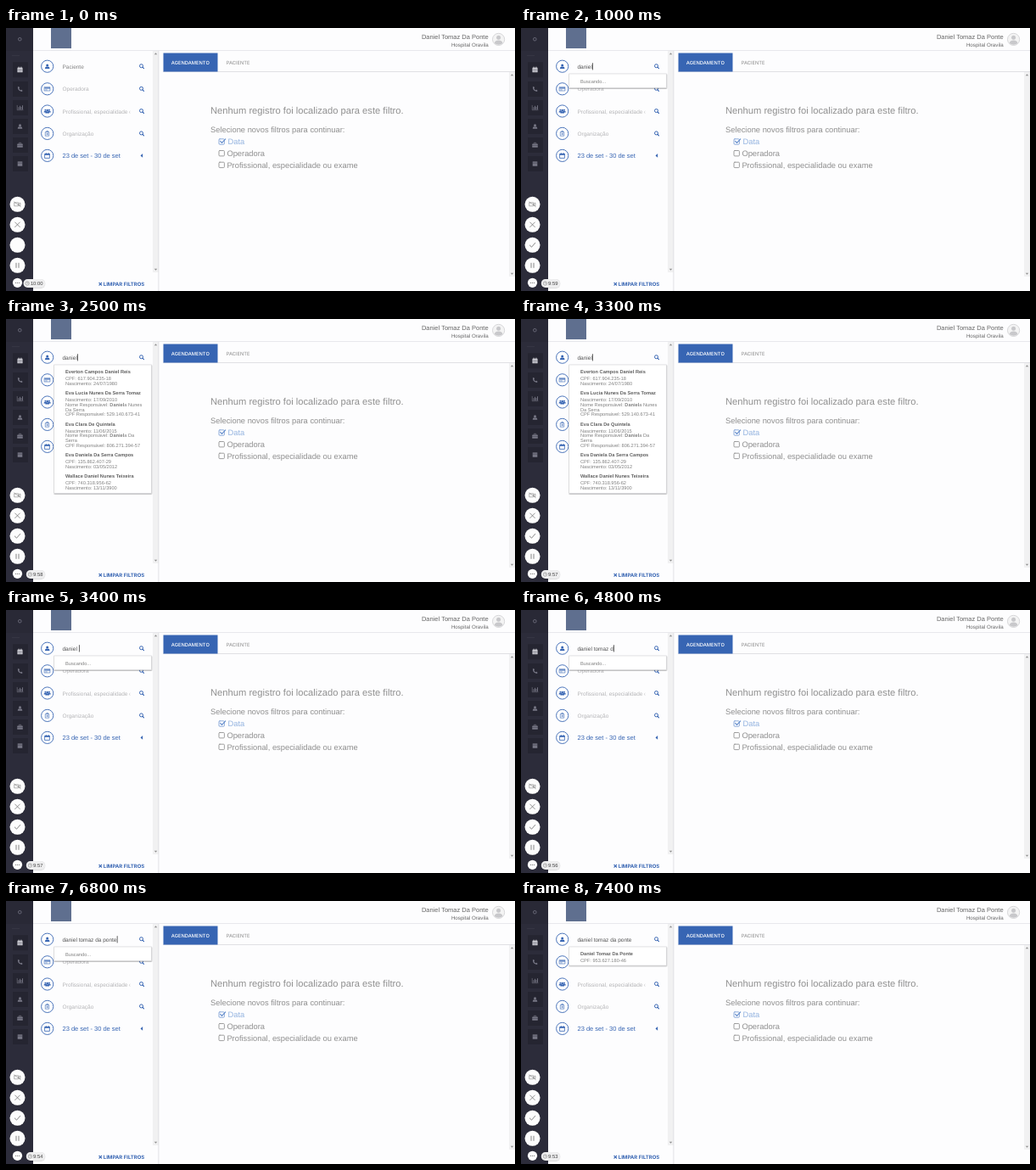
An HTML page for the animation above (8000 ms loop, 600 px wide and 310 px high).

```html
<!DOCTYPE html>
<html lang="pt-BR">
<head>
<meta charset="utf-8">
<title>Agendamento</title>
<style>
html, body { margin: 0; width: 100%; height: 100%; overflow: hidden; background: #fdfdfe; }
svg { display: block; width: 600px; height: 310px; }
text { font-family: "Liberation Sans", Arial, sans-serif; white-space: pre; text-rendering: geometricPrecision; }
.caps { font-family: Inter, sans-serif; font-size: 5.75px; }
.line { fill: none; stroke-linecap: round; stroke-linejoin: round; }
</style>
</head>
<body>
<svg id="stage" viewBox="0 0 600 310" xmlns="http://www.w3.org/2000/svg"></svg>
<script>
const LOOP = 8000, BLINK = 600;
const BLUE = '#3765b3', GRAY = '#8f8f8f', PALE = '#b4b4b6', DARK = '#2c2c3a';

const rect = (x, y, w, h, fill, more = '') =>
  `<rect x="${x}" y="${y}" width="${w}" height="${h}" fill="${fill}" ${more}/>`;
const disc = (x, y, r, fill, more = '') =>
  `<circle cx="${x}" cy="${y}" r="${r}" fill="${fill}" ${more}/>`;
const line = (d, color, w = 0.8) =>
  `<path class="line" d="${d}" stroke="${color}" stroke-width="${w}"/>`;
const fill = (d, color) => `<path d="${d}" fill="${color}"/>`;
const text = (x, y, size, color, s, more = '') =>
  `<text x="${x}" y="${y}" font-size="${size}" fill="${color}" ${more}>${s}</text>`;
const at = (x, y, s) => `<g transform="translate(${x} ${y})">${s}</g>`;

// Icons are drawn around their own centre.
const icon = {
  calendar: c => line('M-2.7-2h5.4v5h-5.4zM-1.4-3v1.4M1.4-3v1.4', c, 0.8) + rect(-2.9, -2.2, 5.8, 1.6, c),
  agenda: c => rect(-3, -2.4, 6, 5.4, c) + line('M-1.4-3.2v1.2M1.4-3.2v1.2', c, 0.8) +
    line('M-2.8-.8h5.6M-2.8 1.1h5.6M-1-.8v3.4M1-.8v3.4', DARK, 0.35),
  grid: c => rect(-2.8, -2.6, 5.6, 5.4, c) + line('M-2.6-.8h5.2', DARK, 0.5),
  phone: c => line('M-2-2.2C-2 .4-.4 2 2.2 2.2', c, 1.3) + disc(-1.6, -1.8, 0.9, c) + disc(1.8, 1.7, 0.9, c),
  chart: c => line('M-3.3-2.7v5.4h6.8', c, 0.6) + line('M-1.6 1.6v-2M0 1.6v-3.4M1.5 1.6v-2.3M3 1.6v-4', c, 0.9),
  person: c => disc(0, -1.2, 1.5, c) + fill('M-2.8 2.8Q-2.8.2-1.2.2Q0 1 1.2.2Q2.8.2 2.8 2.8z', c),
  people: c => at(-2.3, -0.4, `<g transform="scale(.65)">${icon.person(c)}</g>`) +
    at(2.3, -0.4, `<g transform="scale(.65)">${icon.person(c)}</g>`) + `<g transform="scale(.85)">${icon.person(c)}</g>`,
  bag: c => rect(-3.3, -1.6, 6.6, 4.4, c, 'rx=".5"') + line('M-1.2-1.7v-1h2.4v1', c, 0.7) + line('M-3.2.5h6.4', DARK, 0.4),
  card: c => line('M-3.2-2.2h6.4v4.4h-6.4z', c, 0.6) + rect(-3.2, -1.5, 6.4, 1.2, c) + line('M-2 1.1h1.6', c, 0.6),
  building: c => line('M-2-1.8h4v4.6h-4zM-.9-1.9v-1.2h1.8v1.2', c, 0.6) + line('M-.9.5h1.8M0-.4v1.8', c, 0.6),
  search: c => `<circle cx="-.5" cy="-.5" r="2" fill="none" stroke="${c}" stroke-width="1"/>` + line('M1.1 1.1L2.5 2.5', c, 1.1),
  camera: c => line('M-3.4-2h4.6v4h-4.6zM1.2-.4L3.4-1.8v3.6L1.2.4M-3.8-2.8L3.8 2.8', c, 0.55),
  cross: c => line('M-2.8-2.8L2.8 2.8M2.8-2.8L-2.8 2.8', c, 0.8),
  check: c => line('M-3.2.2L-1 2.4L3.2-2.4', c, 0.9),
  pause: c => line('M-1.5-2.6v5.2M1.5-2.6v5.2', c, 0.9),
  dots: c => [-2, 0, 2].map(x => disc(x, 0, 0.65, c)).join('')
};

const scrollbar = (x, top, bottom) =>
  rect(x, top, 7, bottom - top, '#f1f1f2') +
  fill(`M${x + 1.8} ${top + 4.3}l1.7-2l1.7 2z`, '#8d8d8d') +
  fill(`M${x + 1.8} ${bottom - 4.3}l1.7 2l1.7-2z`, '#8d8d8d');

function rail() {
  const menu = [['agenda', 49.2, '#e4e4ea'], ['phone', 72], ['chart', 94], ['person', 116], ['bag', 138], ['grid', 160]];
  return rect(0, 0, 32, 310, DARK) + rect(0, 0, 32, 27, '#292936') +
    `<circle cx="16.3" cy="13.2" r="1.8" fill="none" stroke="#777786" stroke-width=".8"/>` +
    rect(7, 32, 9, 0.6, '#3c3c4a') +
    menu.map(([name, y, c = '#777785']) =>
      rect(8, y - 9, 18, 18, '#252531') + at(16.5, y, icon[name](c))).join('');
}

function recorder() {
  const buttons = [['camera', 207.8], ['cross', 231.8], ['check', 255.8], ['pause', 279.8]];
  return buttons.map(([name, y]) => disc(13.5, y, 9, '#fdfdfd', 'filter="url(#soft)"') +
      `<g id="${name}">${at(13.5, y, icon[name]('#777'))}</g>`).join('') +
    disc(13.5, 300.3, 5.6, '#fdfdfd') + at(13.5, 300.3, icon.dots('#777')) +
    `<rect id="pill" y="296" height="10" rx="5" fill="#eeeeef" filter="url(#soft)"/>` +
    `<g id="clock"><circle r="2.2" fill="none" stroke="#888" stroke-width=".6"/>${line('M0-1.2V0h1', '#888', 0.5)}</g>` +
    text(43.4, 303.2, 5.8, '#444', '', 'id="timer" text-anchor="end"');
}

function filters() {
  const rows = [['person', 45.2], ['card', 71.8, 'Operadora'], ['people', 98, 'Profissional, especialidade ou exame'],
    ['building', 124.4, 'Organização'], ['calendar', 150.4]];
  return scrollbar(173, 27, 288) +
    rows.map(([name, y, label]) =>
      disc(48.7, y, 7.1, '#fff', `stroke="${BLUE}" stroke-width=".9"`) + at(48.7, y, icon[name](BLUE)) +
      (y < 150 ? at(160, y, icon.search(BLUE)) : fill(`M158.5 ${y}l2.6-2.3v4.6z`, BLUE)) +
      (label ? text(66.5, y + 2.5, 6.5, PALE, label, 'clip-path="url(#field)"') : '')).join('') +
    text(66.5, 153.1, 7.5, BLUE, '23 de set - 30 de set') +
    line('M109.9 300.4l2.8 2.8M112.7 300.4l-2.8 2.8', BLUE, 1.2) +
    `<text class="caps" x="114.8" y="304" fill="${BLUE}" font-weight="700" style="font-size:6px">LIMPAR FILTROS</text>`;
}

function main() {
  const box = (y, label, on) => {
    const c = on ? '#7b9fd6' : GRAY;
    return line(`M252 ${y - 3}h4.4q1 0 1 1v4.4q0 1-1 1h-4.4q-1 0-1-1v-4.4q0-1 1-1z`, c, 0.85) +
      (on ? line(`M252.6 ${y - 0.4}l1.9 1.9l4.2-4.4`, '#5f8acb', 1.1) : '') +
      text(on ? 261.5 : 260.4, y + 3.4, 9.36, on ? '#93b3e0' : GRAY, label);
  };
  return scrollbar(593, 52, 293) +
    rect(179.5, 27, 0.8, 283, '#dcdce0') + rect(185, 51.2, 415, 0.8, '#dadade') +
    rect(185.5, 29.5, 64, 22, BLUE) +
    `<text class="caps" x="194.8" y="43" fill="#fff" font-weight="500">AGENDAMENTO</text>` +
    `<text class="caps" x="259.8" y="43" fill="#8a8a8a">PACIENTE</text>` +
    text(241, 100.8, 11.2, GRAY, 'Nenhum registro foi localizado para este filtro.') +
    text(241, 123.3, 9.36, GRAY, 'Selecione novos filtros para continuar:') +
    box(133.8, 'Data', true) + box(147.5, 'Operadora') + box(161.2, 'Profissional, especialidade ou exame');
}

function header() {
  return rect(32, 26, 568, 0.8, '#e4e4e8') + rect(53, 0, 24, 24, '#5f6f8f') +
    text(568.6, 13.2, 7.5, '#666', 'Daniel Tomaz Da Ponte', 'text-anchor="end"') +
    text(568.6, 22.1, 6.2, '#666', 'Hospital Oravila', 'text-anchor="end"') +
    disc(580.6, 13.4, 7.1, '#f4f4f4', 'stroke="#cfcfd1" stroke-width=".8"') +
    disc(580.6, 11.2, 2.5, '#c8c8cb') + fill('M575.8 18Q576 14.4 580.6 14.4Q585.2 14.4 585.4 18Q580.6 21.4 575.8 18z', '#c8c8cb');
}

const hit = '<tspan font-weight="700">Daniel</tspan>a';
const people = [
  ['Everton Campos Daniel Reis', 'CPF: 617.904.235-18', 'Nascimento: 24/07/1980'],
  ['Eva Lucia Nunes Da Serra Tomaz', 'Nascimento: 17/09/2010', `Nome Responsável: ${hit} Nunes`, 'Da Serra', 'CPF Responsável: 529.140.673-41'],
  ['Eva Clara De Quintela', 'Nascimento: 11/06/2015', `Nome Responsável: ${hit} Da`, 'Serra', 'CPF Responsável: 806.271.394-57'],
  ['Eva Daniela Da Serra Campos', 'CPF: 135.862.407-29', 'Nascimento: 03/05/2012'],
  ['Wallace Daniel Nunes Teixeira', 'CPF: 740.318.956-62', 'Nascimento: 13/11/3900']
];
const found = [['Daniel Tomaz Da Ponte', 'CPF: 953.627.180-46']];

function panel(id, bottom, body) {
  const frame = 'stroke="#d2d2d5" stroke-width=".6" filter="url(#drop)"';
  return `<g id="${id}">${rect(56.7, 54, 114.6, bottom - 54, '#fff', frame)}${body}</g>`;
}
function results(list) {
  let y = 64.1, out = '';
  for (const [name, ...info] of list) {
    out += text(70, y, 5.65, '#606060', name, 'font-weight="700"');
    y += 8.1;
    for (const s of info) {
      out += text(70, y, 5.65, '#808080', s);
      y += 5.6;
    }
    y += 5.9;
  }
  return out;
}

const stage = document.getElementById('stage');
stage.innerHTML = `<defs>
  <clipPath id="field"><rect x="60" y="30" width="86.3" height="130"/></clipPath>
  <filter id="soft" x="-30%" y="-30%" width="160%" height="160%"><feDropShadow dx="0" dy=".4" stdDeviation=".6" flood-opacity=".3"/></filter>
  <filter id="drop" x="-10%" y="-20%" width="120%" height="150%"><feDropShadow dx=".3" dy=".7" stdDeviation=".7" flood-opacity=".4"/></filter>
  </defs>` + rect(0, 0, 600, 310, '#fdfdfe') + header() + filters() + main() + rail() + recorder() +
  text(66.5, 47.8, 6.5, '#555', '', 'id="query"') + rect(0, 41.2, 0.7, 8.2, '#222', 'id="caret"') +
  panel('busy', 70.5, text(70, 64.5, 5.7, '#808080', 'Buscando...')) +
  panel('many', 205.3, results(people)) + panel('one', 76, results(found));

const $ = id => document.getElementById(id);
const show = (id, on) => $(id).setAttribute('visibility', on ? 'visible' : 'hidden');

// [time, letters typed so far]
const phrase = 'daniel tomaz da ponte';
const keys = [[300, 1], [400, 2], [500, 3], [600, 4], [800, 5], [900, 6], [3400, 7],
  [4000, 8], [4100, 9], [4200, 10], [4300, 11], [4500, 12], [4600, 13], [4800, 14],
  [4900, 15], [5000, 16], [5100, 17], [5200, 18], [5400, 20], [5600, 21]];
const panels = [[0, ''], [500, 'busy'], [2500, 'many'], [3400, 'busy'], [6900, 'one']];
const latest = (steps, t) => steps.filter(s => s[0] <= t).pop();

function draw(t) {
  const key = latest(keys, t);
  const query = $('query');
  query.textContent = key ? phrase.slice(0, key[1]) : 'Paciente';
  query.setAttribute('fill', key ? '#505050' : '#808080');
  show('caret', key && Math.floor((t - key[0]) / BLINK) % 2 === 0);
  if (key) $('caret').setAttribute('x', 66.8 + query.getComputedTextLength());

  const open = latest(panels, t)[1];
  for (const id of ['busy', 'many', 'one']) show(id, id === open);
  show('check', t >= 300);

  const left = 600 - Math.floor(t / 1000);
  const pillX = left === 600 ? 20.5 : 23.8;
  $('timer').textContent = Math.floor(left / 60) + ':' + String(left % 60).padStart(2, '0');
  $('pill').setAttribute('x', pillX);
  $('pill').setAttribute('width', 46.3 - pillX);
  $('clock').setAttribute('transform', `translate(${pillX + 4.6} 301)`);
}

const start = performance.now();
function tick() {
  draw((performance.now() - start) % LOOP);
  requestAnimationFrame(tick);
}
tick();
</script>
</body>
</html>
```
